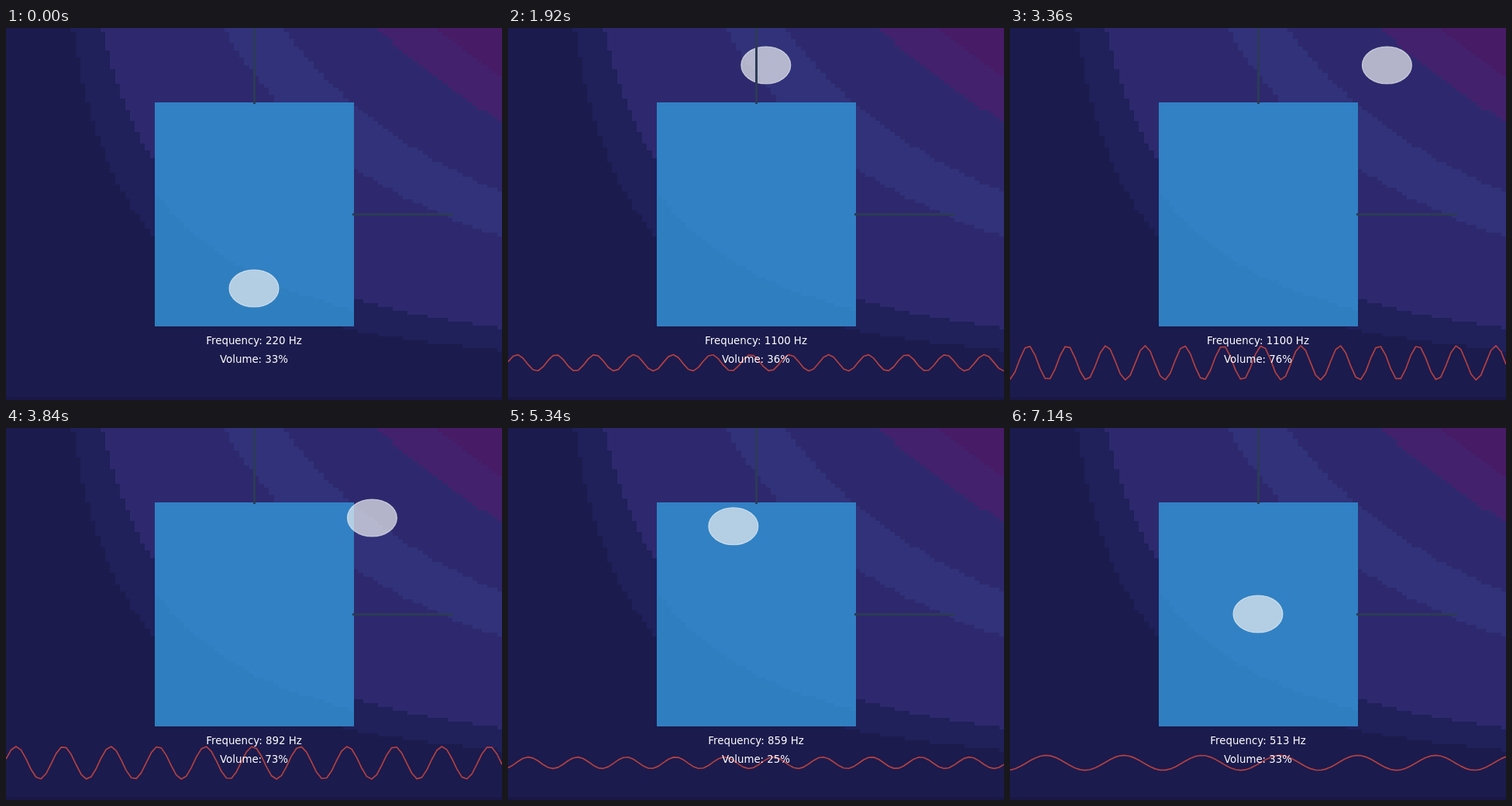
An HTML page with a canvas that plays this animation: 640x480 px, repeating every 7.2 s.

```html
<!DOCTYPE html>
<html lang="en">
<head>
<meta charset="utf-8">
<title>Theremin</title>
<style>
  html, body { margin: 0; width: 100%; height: 100%; overflow: hidden; background: #1b1b4d; }
  canvas, svg { position: absolute; left: 0; top: 0; width: 640px; height: 480px; display: block; }
  text { font: 13.333px "DejaVu Sans", sans-serif; fill: #fff; text-anchor: middle; }
</style>
</head>
<body>
<canvas id="field" width="640" height="480"></canvas>
<svg viewBox="0 0 640 480">
  <ellipse id="hand" rx="32" ry="24" fill="#ecf0f1" stroke="#ecf0f1" stroke-width="1.11" fill-opacity=".7" stroke-opacity=".7"/>
  <g fill="#2c3b55" shape-rendering="crispEdges">
    <rect x="319" y="0" width="3" height="98"/>
    <rect x="447" y="239" width="130" height="3"/>
  </g>
  <path id="wave" fill="none" stroke="#e74c3c" stroke-opacity=".75" stroke-width="1.67" stroke-linejoin="round"/>
  <text id="freq" x="320" y="408"></text>
  <text id="vol" x="320" y="432"></text>
</svg>
<script>
const W = 640, H = 480, STEP = 60, COUNT = 120, CELLS = 100;
const el = id => document.getElementById(id);
const hand = el('hand'), wave = el('wave'), freq = el('freq'), vol = el('vol');

// Colour bands follow the product of column and row: [lower limit, colour]
const bands = [
  [0, '#1b1b4d'], [1275, '#20205a'], [1863, '#2e296e'], [4320, '#31327a'],
  [5500, '#2e296e'], [7400, '#43216c'], [8600, '#471b66']
];
const boxBands = [[0, '#2f7fc0'], [1650, '#3181c4']];

function paintCells(ctx, list) {
  for (let i = 0; i < CELLS; i++) {
    const x = Math.round(i * W / CELLS), w = Math.round((i + 1) * W / CELLS) - x;
    for (let j = 0; j < CELLS; j++) {
      const y = Math.round(H - (j + 1) * H / CELLS), h = Math.round(H - j * H / CELLS) - y;
      ctx.fillStyle = list.filter(b => i * j >= b[0]).pop()[1];
      ctx.fillRect(x, y, w, h);
    }
  }
}

function paintField() {
  const ctx = el('field').getContext('2d');
  paintCells(ctx, bands);
  ctx.fillStyle = '#191748';
  ctx.fillRect(0, 476, W, 4);
  ctx.beginPath();
  ctx.rect(192, 96, 257, 289);
  ctx.clip();
  paintCells(ctx, boxBands);
}

// Hand position in unit coordinates, y pointing up
function handAt(n) {
  if (n < 30) return [0.5, 0.3 + 0.02 * n];
  if (n < 60) return [0.5 + 0.01 * (n - 30), 0.9];
  if (n < 90) {
    const a = (n - 60) * 0.1;
    return [0.6 + 0.15 * Math.cos(a), 0.7 + 0.15 * Math.sin(a)];
  }
  const k = Math.min((n - 90) / 20, 1);
  return [0.6 - 0.1 * k, 0.7 - 0.2 * k];
}

function wavePath(n, pitch, volume) {
  const points = [];
  for (let i = 0; i < 100; i++) {
    const x = i / 99;
    const y = 0.1 + 0.06 * volume * Math.sin(20 * (1 + 3 * pitch) * x + 0.2 * n);
    points.push((x * W).toFixed(2) + ' ' + ((1 - y) * H).toFixed(2));
  }
  return 'M' + points.join('L');
}

function draw(n) {
  const [x, y] = handAt(n);
  const pitch = (y - 0.3) / 0.6, volume = (x - 0.3) / 0.6;
  hand.setAttribute('cx', x * W);
  hand.setAttribute('cy', (1 - y) * H);
  wave.setAttribute('d', n ? wavePath(n, pitch, volume) : '');
  freq.textContent = `Frequency: ${Math.floor(220 + 880 * pitch + 1e-6)} Hz`;
  vol.textContent = `Volume: ${Math.floor(100 * volume + 1e-6)}%`;
}

let shown = -1;
function tick() {
  const n = Math.floor(performance.now() / STEP) % COUNT;
  if (n !== shown) draw(shown = n);
  requestAnimationFrame(tick);
}

paintField();
tick();
</script>
</body>
</html>
```
